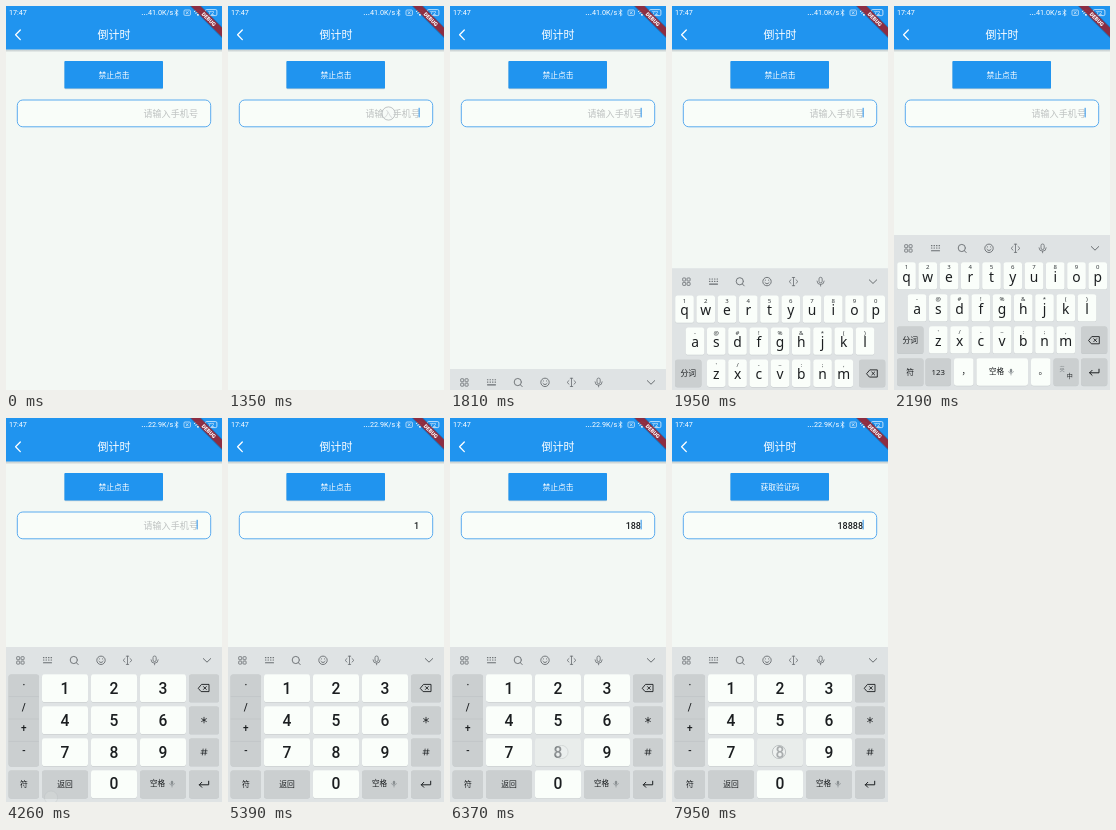
Recreate the animation shown at these times as an HTML page. Size 216 by 384 pixels, loop 8000 ms.

```html
<!DOCTYPE html>
<html lang="zh">
<head>
<meta charset="utf-8">
<style>
html, body { margin: 0; width: 100%; height: 100%; overflow: hidden; background: #f3f8f4; }
svg { display: block; width: 100%; height: 100%; }
text { font-family: Roboto, "Noto Sans CJK SC", "Noto Sans CJK", sans-serif; }
.letters text { font-family: "Noto Sans", "Noto Sans CJK SC", "Noto Sans CJK", sans-serif; }
</style>
</head>
<body>
<svg id="stage" viewBox="0 0 216 384"></svg>
<script>
const LOOP = 8000;
const stage = document.getElementById('stage');
const INK = '#1b1e20', WHITE = '#fafefa', GREY = '#cbcfd0', BLUE = '#2094ef', ICON = '#686d70';
const MEDIUM = { 'font-weight': 500 };

function el(parent, tag, attrs = {}, content) {
  const node = document.createElementNS('http://www.w3.org/2000/svg', tag);
  for (const k in attrs) node.setAttribute(k, attrs[k]);
  if (content !== undefined) node.textContent = content;
  parent.appendChild(node);
  return node;
}
const group = (parent, attrs) => el(parent, 'g', attrs);
const rect = (p, x, y, w, h, fill, rx = 0, more = {}) =>
  el(p, 'rect', { x, y, width: w, height: h, fill, rx, ...more });
const label = (p, x, y, size, str, fill = INK, anchor = 'middle', more = {}) =>
  el(p, 'text', { x, y, 'font-size': size, fill, 'text-anchor': anchor, ...more }, str);
const line = (p, d, stroke = ICON, w = .9, more = {}) =>
  el(p, 'path', { d, stroke, fill: 'none', 'stroke-width': w, 'stroke-linecap': 'round', 'stroke-linejoin': 'round', ...more });

// ---- page ----
const defs = el(stage, 'defs');
const shade = el(defs, 'linearGradient', { id: 'shade', x1: 0, y1: 0, x2: 0, y2: 1 });
el(shade, 'stop', { offset: 0, 'stop-color': '#5a6a75', 'stop-opacity': .35 });
el(shade, 'stop', { offset: 1, 'stop-color': '#5a6a75', 'stop-opacity': 0 });

rect(stage, 0, 0, 216, 384, '#f3f8f4');
rect(stage, 0, 43.5, 216, 3, 'url(#shade)');
rect(stage, 0, 0, 216, 43.5, BLUE);
line(stage, 'M14.3 24L9.6 28.8L14.3 33.6', '#fff', 1.3);
label(stage, 108, 32.7, 11, '倒计时', '#fff');

// ---- status bar ----
label(stage, 3, 9.4, 7.2, '17:47', '#fff', 'start');
label(stage, 135.3, 9.2, 8, '...', '#fff', 'start', MEDIUM);
const speed = label(stage, 167.2, 9.2, 7.2, '', '#fff', 'end');
line(stage, 'M168.8 5.2L172.2 8.4L170.5 9.9V3.5L172.2 5L168.8 8.2', '#fff', .6);
rect(stage, 178, 4, 6.4, 5.4, 'none', 1, { stroke: '#fff', 'stroke-width': .6 });
line(stage, 'M180.2 5.6L182.2 7.8M182.2 5.6L180.2 7.8', '#fff', .6);
line(stage, 'M188.3 5.4Q192 2.2 195.7 5.4M189.7 7Q192 5 194.3 7', '#fff', 1);
el(stage, 'circle', { cx: 192, cy: 8.8, r: 1, fill: '#fff' });
rect(stage, 199.3, 3.6, 11.6, 6, 'none', 1.3, { stroke: '#fff', 'stroke-width': .7 });
label(stage, 205, 8.7, 5.6, '72', '#fff');

const ribbon = group(stage, { transform: 'translate(216 0) rotate(45)' });
rect(ribbon, -26, 14.6, 52, 8.2, '#1d2c48', 0, { opacity: .3 });
rect(ribbon, -26, 15.4, 52, 6.6, '#962838', 0, { opacity: .92 });
label(ribbon, 0, 20.6, 5.4, 'DEBUG', '#fff', 'middle', { 'font-weight': 900 });

// ---- button and field ----
rect(stage, 58.5, 55.5, 98.5, 27.7, '#5a6a75', 1, { opacity: .25 });
rect(stage, 58.4, 55, 98.6, 27.5, BLUE, .8);
const action = label(stage, 108, 71.8, 7.8, '', '#fff');
rect(stage, 11.3, 94, 193.4, 26.8, '#f9fdf9', 5.5, { stroke: '#5aabef', 'stroke-width': 1 });
const hint = label(stage, 192, 111.2, 9.1, '请输入手机号', '#bdc1c0', 'end');
const typed = label(stage, 191, 110.8, 9, '', INK, 'end', MEDIUM);
const caret = rect(stage, 190.6, 101.8, 1.1, 9.6, '#3a98ea');

// ---- keyboard, top edge at y = 229 ----
const board = group(stage);
rect(board, 0, 229, 216, 160, '#dfe3e4');

const ROW = r => 256.2 + r * 32.05;
function key(p, x, y, w, h, fill = WHITE) {
  rect(p, x, y + .5, w, h, '#c3c8ca', 2.6);
  return rect(p, x, y, w, h, fill, 2.6);
}
function drawTools() {
  for (const x of [10.7, 15.1]) for (const y of [238.7, 243.1])
    rect(board, x, y, 3, 3, 'none', .5, { stroke: ICON, 'stroke-width': .8 });
  line(board, 'M37.5 239.7H45.5M37.5 242H45.5', ICON, 1.2, { 'stroke-dasharray': '.4 2.13' });
  line(board, 'M37.5 244.8H45.5', ICON, 1.1);
  line(board, 'M70.4 244.7L72.2 246.6M71.4 242a3.6 3.6 0 1 0 -7.2 0a3.6 3.6 0 1 0 7.2 0');
  el(board, 'circle', { cx: 95, cy: 242.3, r: 4.2, fill: 'none', stroke: ICON, 'stroke-width': .9 });
  line(board, 'M92.9 243.3Q95 246 97.1 243.3M93.4 240.8v.2M96.6 240.8v.2');
  line(board, 'M121.5 238.2V246.4M120.3 238.2H122.7M120.3 246.4H122.7M119 240.5L117.1 242.3L119 244.1M124 240.5L125.9 242.3L124 244.1', ICON, .8);
  rect(board, 147, 238, 3.2, 5.6, 'none', 1.6, { stroke: ICON, 'stroke-width': .8 });
  line(board, 'M145 241.8Q145.1 245.2 148.6 245.2Q152.1 245.2 152.2 241.8M148.6 245.2V246.8', ICON, .8);
  line(board, 'M197.3 240.6L201 244.2L204.7 240.6', ICON, 1);
}
function eraser(p, x, y) {
  line(p, `M${x - 5.5} ${y}L${x - 2.5} ${y - 3.6}H${x + 5}V${y + 3.6}H${x - 2.5}Z`, INK, .9);
  line(p, `M${x - .5} ${y - 1.4}l2.8 2.8m0 -2.8l-2.8 2.8`, INK, .9);
}
const enter = (p, x, y) =>
  line(p, `M${x + 4.7} ${y - 2.8}V${y + .8}H${x - 4.7}M${x - 2.2} ${y - 1.7}L${x - 4.7} ${y + .8}L${x - 2.2} ${y + 3.3}`, INK, 1);
function space(p, x, y) {
  label(p, x - 5.5, y + 2.4, 7.6, '空格');
  rect(p, x + 7.8, y - 3.2, 2.4, 4, '#8a9092', 1.2);
  line(p, `M${x + 6.5} ${y - .4}q2.5 4 5 0M${x + 9} ${y + 1.8}v1.2`, '#8a9092', .7);
}

drawTools();
const letters = group(board, { class: 'letters' }), numbers = group(board);
const ROWS = [
  ['qwertyuiop', '1234567890', 12.5],
  ['asdfghjkl', '-@#!%&*()', 23],
  ['zxcvbnm', "'/-~:;,", 44.3]
];
ROWS.forEach(([chars, marks, x0], r) => {
  const y = ROW(r);
  [...chars].forEach((c, i) => {
    const x = x0 + i * 21.25;
    key(letters, x - 9.3, y, 18.6, 27.3);
    label(letters, x, y + 7.2, 6, marks[i], '#303538', 'middle', MEDIUM);
    label(letters, x, y + 19.6, 13.8, c, INK, 'middle', MEDIUM);
  });
});
key(letters, 3, ROW(2), 26.5, 27.3, GREY);
label(letters, 16.2, 337, 7.8, '分词');
key(letters, 187, ROW(2), 26.3, 27.3, GREY);
eraser(letters, 200.3, 334.2);
const bottom = [[3, 26.5, GREY], [31.5, 25.5, GREY], [60, 19.5, WHITE], [82.5, 51.5, WHITE],
  [137, 19.5, WHITE], [159.5, 25, GREY], [187, 26.3, GREY]];
for (const [x, w, fill] of bottom) key(letters, x, ROW(3), w, 27.3, fill);
label(letters, 16.2, 368.6, 7.8, '符');
label(letters, 44.2, 368.8, 7.8, '123', INK, 'middle', MEDIUM);
label(letters, 72, 368.2, 9, '，');
space(letters, 108, 366);
label(letters, 149, 368.2, 9, '。');
label(letters, 168.2, 364.8, 5.2, '英', '#83898c');
label(letters, 175.8, 372, 6, '中');
enter(letters, 200.3, 366);

key(numbers, 2.5, ROW(0), 30.5, 92, GREY);
['·', '/', '+', '-'].forEach((c, i) => {
  if (i) line(numbers, `M3 ${ROW(0) + i * 22.4}H32.5`, '#bcc1c3', .6);
  label(numbers, 17.8, 271 + i * 21.6, 10, c, INK, 'middle', MEDIUM);
});
let eight;
[...'123456789'].forEach((c, i) => {
  const x = 36 + i % 3 * 49, y = ROW(Math.floor(i / 3));
  const cap = key(numbers, x, y, 46, 27.8);
  const digit = label(numbers, x + 23, y + 19.3, 15.6, c, INK, 'middle', MEDIUM);
  if (c === '8') eight = { cap, digit };
});
for (let r = 0; r < 4; r++) key(numbers, 183, ROW(r), 30, 27.8, GREY);
eraser(numbers, 198, 270);
line(numbers, 'M198 299.3V304.9M195.6 300.7L200.4 303.5M200.4 300.7L195.6 303.5', INK, .8);
line(numbers, 'M197.1 331L196.4 337M199.8 331L199.1 337M195.3 332.8H201.2M194.9 335.2H200.8', INK, .7);
enter(numbers, 198, 366);
key(numbers, 2.5, ROW(3), 30.5, 27.8, GREY);
label(numbers, 17.8, 368.6, 7.8, '符');
key(numbers, 36, ROW(3), 46, 27.8, GREY);
label(numbers, 59, 368.6, 7.8, '返回');
key(numbers, 85, ROW(3), 46, 27.8);
label(numbers, 108, ROW(3) + 18.9, 15.6, '0', INK, 'middle', MEDIUM);
key(numbers, 134, ROW(3), 46, 27.8, GREY);
space(numbers, 157, 366);

const ring = el(stage, 'circle', { r: 6.6, fill: '#f6f8f8', 'fill-opacity': .4, stroke: '#b0b5b6', 'stroke-width': .8 });

// ---- motion ----
const TAPS = [ // down, up, x, y
  [1200, 1370, 160.5, 107.5], [3960, 4170, 45, 379.5], [4760, 5080, 71, 275],
  [5560, 5660, 111, 334], [6240, 6300, 111.5, 334], [7150, 7300, 107, 334], [7660, 7970, 107, 334]
];
const FADE = 130;
const COMMITS = [4800, 5600, 6300, 7200, 7700];
const BLINKS = [1320, 1800, ...COMMITS];
const clamp = v => Math.max(0, Math.min(1, v));
const lastBefore = (list, t) => list.filter(v => v <= t).pop();

function draw(t) {
  const count = COMMITS.filter(c => c <= t).length;
  typed.textContent = '18888'.slice(0, count);
  hint.setAttribute('visibility', count ? 'hidden' : 'visible');
  action.textContent = count === 5 ? '获取验证码' : '禁止点击';
  speed.textContent = (t < 2650 ? '41.0' : '22.9') + 'K/s';

  const start = lastBefore(BLINKS, t);
  const lit = start !== undefined && (t - start) % 1000 < 500;
  caret.setAttribute('visibility', lit ? 'visible' : 'hidden');

  const left = 1 - clamp((t - 1790) / 300);
  board.setAttribute('transform', `translate(0 ${155 * left * left})`);
  const numeric = t >= 4100;
  letters.setAttribute('display', numeric ? 'none' : 'inline');
  numbers.setAttribute('display', numeric ? 'inline' : 'none');

  const tap = TAPS.filter(p => p[0] <= t).pop();
  let alpha = 0;
  if (tap) {
    const [down, up, x, y] = tap;
    alpha = Math.min(clamp((t - down) / 60), 1 - clamp((t - up) / FADE));
    ring.setAttribute('cx', x);
    ring.setAttribute('cy', y);
  }
  ring.setAttribute('opacity', alpha);
  const pressed = alpha > 0 && tap[3] === 334;
  eight.cap.setAttribute('fill', pressed ? '#e9edeb' : WHITE);
  eight.digit.setAttribute('fill', pressed ? '#777c7e' : INK);
}

const began = performance.now();
function tick() {
  draw((performance.now() - began) % LOOP);
  requestAnimationFrame(tick);
}
draw(0);
requestAnimationFrame(tick);
</script>
</body>
</html>
```
